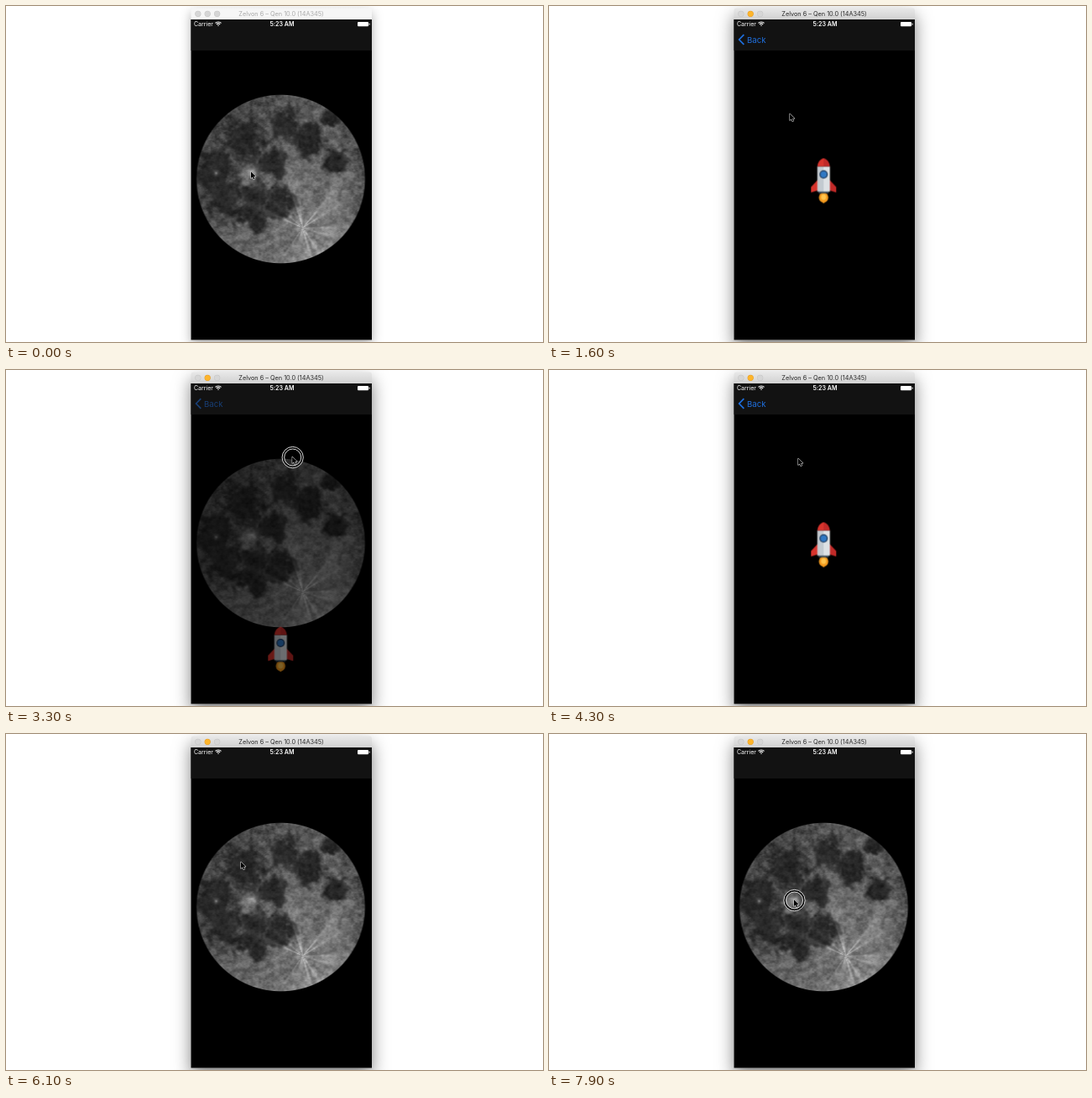
These frames come from a looping animation (640 by 400 pixels, 8 s). An HTML page with a canvas:

```html
<!DOCTYPE html>
<html lang="en">
<head>
<meta charset="utf-8">
<title>Moon and rocket transition</title>
<style>
html, body { margin: 0; width: 100%; height: 100%; overflow: hidden; background: #fff; }
canvas { display: block; }
</style>
</head>
<body>
<canvas id="stage" width="640" height="400"></canvas>
<script>
const LOOP = 8000;
const FONT = 'Inter, sans-serif';
const ctx = document.getElementById('stage').getContext('2d');

const clamp = v => Math.max(0, Math.min(1, v));
const mix = (a, b, k) => a + (b - a) * k;
const smooth = v => { v = clamp(v); return v * v * (3 - 2 * v); };
const within = (t, a, b) => t >= a && t < b;
const ease = (t, a, b) => smooth((t - a) / (b - a));
const hump = (t, a, b) => Math.sin(Math.PI * clamp((t - a) / (b - a))) ** 2;

// Sideways drag of the finger: two cancelled swipes, then a completed one
const swipe = t => hump(t, 1850, 2750) + 0.53 * hump(t, 2750, 4000)
  + ease(t, 4600, 5500) - ease(t, 5600, 6100);

// 0 shows the rocket, 1 shows the moon
function progressAt(t) {
  if (t < 1800) return 1 - ease(t, 900, 1500);
  return t < 5600 ? swipe(t) : 1;
}

// Where the pointer would be without the swipes: time, x, y
const rest = [
  [0, 292, 197], [900, 292, 197], [1600, 287, 128], [2200, 290, 98], [3300, 290, 103],
  [4300, 297, 105], [5400, 297, 102], [6100, 280, 152], [6700, 330, -14], [7600, 292, 197], [LOOP, 292, 197]
];

function pointerAt(t) {
  const i = rest.findIndex((k, n) => n && t <= k[0]);
  const [t0, x0, y0] = rest[i - 1], [t1, x1, y1] = rest[i];
  const k = ease(t, t0, t1);
  return [mix(x0, x1, k) + 100 * swipe(t), mix(y0, y1, k)];
}

function oval(c, color, x, y, rx, ry = rx) {
  c.fillStyle = color;
  c.beginPath();
  c.ellipse(x, y, rx, ry, 0, 0, 7);
  c.fill();
}

function trace(c, ...points) {
  c.beginPath();
  points.forEach(p => c.lineTo(...p));
}

function ring(color, x, y, r, width, from = 0, to = 7) {
  ctx.strokeStyle = color;
  ctx.lineWidth = width;
  ctx.beginPath();
  ctx.arc(x, y, r, from, to);
  ctx.stroke();
}

function text(str, x, y, size, color, align = 'left', weight = 400) {
  ctx.font = `${weight} ${size}px ${FONT}`;
  ctx.textAlign = align;
  ctx.fillStyle = color;
  ctx.fillText(str, x, y);
}

function layer(width, height) {
  const canvas = document.createElement('canvas');
  return Object.assign(canvas, { width, height }).getContext('2d');
}

function hash(x, y) {
  const s = Math.sin(x * 127.1 + y * 311.7) * 43758.5;
  return s - Math.floor(s);
}

function noise(x, y) {
  const i = Math.floor(x), j = Math.floor(y), u = smooth(x - i), v = smooth(y - j);
  return mix(mix(hash(i, j), hash(i + 1, j), u), mix(hash(i, j + 1), hash(i + 1, j + 1), u), v);
}

const fractal = (x, y) =>
  (noise(x, y) * 4 + noise(x * 2, y * 2) * 3 + noise(x * 4, y * 4) * 2) / 9;

// Dark plains: x, y, radius from the centre of the disc
const plains = [
  [-45, -44, 28], [5, -65, 20], [31, -48, 23], [59, -73, 12], [65, -22, 14],
  [-76, -10, 27], [-65, 20, 28], [-34, 26, 26], [-2, 27, 22], [-27, 55, 13], [-9, -18, 19]
];

function moonTone(x, y) {
  const depth = Math.max(...plains.map(([px, py, r]) => 1 - Math.hypot(x - px, y - py) / r));
  const plain = smooth(depth * 1.5 + 0.35 + (fractal(x / 14 + 40, y / 14 + 40) - 0.5) * 2.2);
  const land = 94 + 0.2 * (x + y) - 40 * ease(x, 58, 105);
  const grain = (fractal(x / 5 + 90, y / 5 + 90) - 0.5) * mix(85, 38, plain);
  const glow = (px, py, size) => Math.exp(-Math.hypot(x - px, y - py) / size);
  const angle = Math.atan2(y - 58, x - 26);
  const rays = noise(angle * 7 + 50, 3) ** 3 * glow(26, 58, 50) * 75;
  return mix(land, 38, plain) + grain + rays
    + 95 * glow(-35, -9, 6) + 110 * glow(-77, -7, 2) + 60 * glow(26, 58, 4);
}

function makeMoon(size, radius) {
  const c = layer(size, size), image = c.createImageData(size, size);
  for (let i = 0; i < size * size; i++) {
    const x = i % size - size / 2 + 0.5, y = Math.floor(i / size) - size / 2 + 0.5;
    image.data.fill(moonTone(x, y), i * 4, i * 4 + 3);
    image.data[i * 4 + 3] = 255 * clamp(radius + 0.5 - Math.hypot(x, y));
  }
  c.putImageData(image, 0, 0);
  return c.canvas;
}

function makeRocket() {
  const c = layer(34, 56);
  c.translate(17, 0.5);
  oval(c, '#f39a1f', 0, 47, 5.6, 6);
  trace(c, [-4.5, 50], [0, 54], [4.5, 50]);
  c.fill();
  oval(c, '#ffc44d', 0, 46.5, 3, 3.5);
  c.fillStyle = '#334453';
  c.fillRect(-6, 39, 12, 3);
  for (const side of [-1, 1]) {
    const red = side < 0 ? '#d8342d' : '#c12a28';
    c.fillStyle = red;
    trace(c, [side * 7, 26], [side * 15, 34.5], [side * 15, 41], [side * 7, 38.5]);
    c.fill();
    c.fillStyle = side < 0 ? '#c3cad0' : '#dde1e4';
    c.fillRect(Math.min(0, side * 7.5), 10, 7.5, 30);
    c.fillStyle = red;
    c.beginPath();
    c.moveTo(0, 0);
    c.quadraticCurveTo(side * 6.5, 2, side * 7.5, 10);
    c.lineTo(0, 10);
    c.fill();
  }
  oval(c, '#203d5f', 0, 19.5, 5);
  oval(c, '#2f78c4', 0, 19.5, 3.7);
  return c.canvas;
}

const moon = makeMoon(204, 100.3);
const rocket = makeRocket();

function drawWindow(active) {
  ctx.save();
  ctx.shadowColor = active ? 'rgba(0,0,0,.5)' : 'rgba(0,0,0,.32)';
  ctx.shadowBlur = active ? 20 : 13;
  ctx.shadowOffsetY = active ? 9 : 5;
  const bar = ctx.createLinearGradient(0, 2, 0, 16);
  bar.addColorStop(0, active ? '#e9e9e9' : '#f6f6f6');
  bar.addColorStop(1, active ? '#d1d1d1' : '#f6f6f6');
  ctx.fillStyle = bar;
  ctx.beginPath();
  ctx.roundRect(220.5, 2.5, 215.5, 395, [3, 3, 0, 0]);
  ctx.fill();
  ctx.restore();

  for (let i = 0; i < 3; i++) {
    const lit = active && i === 1;
    oval(ctx, lit ? '#e39b27' : '#c4c4c4', 228.8 + i * 11.4, 9.3, 3.6);
    oval(ctx, lit ? '#fdb52c' : '#d6d6d6', 228.8 + i * 11.4, 9.3, 3.1);
  }
  text('Zelvon 6 – Qen 10.0 (14A345)', 328, 12, 7.3, active ? '#2c2c2c' : '#aaa', 'center');

  ctx.fillStyle = '#000';
  ctx.fillRect(220.5, 16, 215.5, 381.5);
  ctx.fillStyle = '#121212';
  ctx.fillRect(220.5, 16, 215.5, 37);
}

function drawStatus() {
  text('Carrier', 224, 24.2, 7, '#fff');
  text('5:23 AM', 329, 24.2, 7.1, '#fff', 'center', 600);
  for (const r of [1, 3, 5]) ring('#fff', 253, 24, r, 1.1, -2.36, -0.78);
  ctx.fillStyle = '#fff';
  ctx.beginPath();
  ctx.roundRect(419, 19, 13, 5.2, 1);
  ctx.fill();
  ctx.fillRect(432.6, 20.6, 1, 2);
}

function drawBack(alpha) {
  ctx.globalAlpha = alpha;
  ctx.strokeStyle = '#1f70e0';
  ctx.lineWidth = 1.7;
  trace(ctx, [232.3, 34.2], [226.6, 40], [232.3, 45.8]);
  ctx.stroke();
  text('Back', 236, 43.6, 9.6, '#1f70e0');
  ctx.globalAlpha = 1;
}

function drawScene(p) {
  ctx.save();
  ctx.beginPath();
  ctx.rect(221, 53, 215, 344.5);
  ctx.clip();
  ctx.globalAlpha = p;
  ctx.drawImage(moon, 225.5, 104);
  ctx.globalAlpha = 1 - p;
  ctx.drawImage(rocket, 310.3, 180.5 + 243 * p);
  ctx.restore();
}

function drawPointer([x, y], touching) {
  if (touching) {
    ring('#000', x + 0.5, y + 1, 11.4, 2.4);
    ring('#eee', x + 0.5, y + 1, 12.6, 0.9);
    ring('#eee', x + 0.5, y + 1, 10, 0.9);
  }
  ctx.save();
  ctx.translate(x, y);
  ctx.scale(0.9, 0.9);
  ctx.lineJoin = 'round';
  ctx.lineWidth = 1.2;
  ctx.strokeStyle = '#ddd';
  trace(ctx, [0, 0.3], [0, 9], [2, 7.2], [3.4, 10.3], [4.8, 9.7], [3.5, 6.7], [6.2, 6.5]);
  ctx.closePath();
  ctx.stroke();
  ctx.fillStyle = '#000';
  ctx.fill();
  ctx.restore();
}

function draw(t) {
  const touches = [[700, 850], [1850, 4050], [4600, 5500], [7800, LOOP]];
  const p = progressAt(t);
  ctx.fillStyle = '#fff';
  ctx.fillRect(0, 0, 640, 400);
  drawWindow(within(t, 150, 6600) || t >= 7750);
  drawStatus();
  drawBack(1 - p);
  drawScene(p);
  drawPointer(pointerAt(t), touches.some(span => within(t, ...span)));
}

function tick() {
  draw(performance.now() % LOOP);
  requestAnimationFrame(tick);
}
tick();
</script>
</body>
</html>
```
